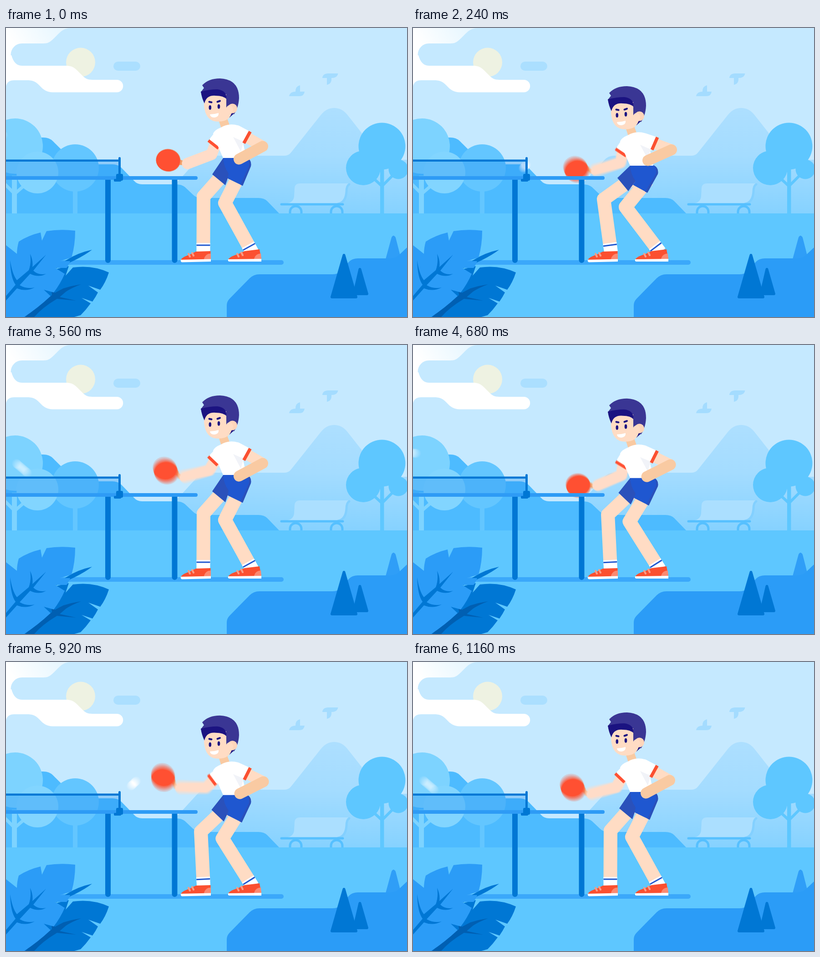
An HTML page for the animation above (1200 ms loop, 881 px wide and 636 px high).

```html
<!DOCTYPE html>
<html lang="en">
<head>
<meta charset="utf-8">
<title>Table tennis in the park</title>
<style>
html, body { margin: 0; width: 100%; height: 100%; overflow: hidden; background: #c5e9ff; }
svg { display: block; width: 881px; height: 636px; }
.blur { isolation: isolate; }
.blur > * { mix-blend-mode: plus-lighter; }
.line { fill: none; stroke-linecap: round; stroke-linejoin: round; }
</style>
</head>
<body>
<svg viewBox="0 0 881 636" xmlns="http://www.w3.org/2000/svg">
  <defs>
    <linearGradient id="mist" gradientUnits="userSpaceOnUse" x1="30" y1="60" x2="125" y2="0">
      <stop offset="0" stop-color="#fff"/><stop offset="1" stop-color="#e6f6ff"/>
    </linearGradient>
    <linearGradient id="peak" gradientUnits="userSpaceOnUse" x1="0" y1="176" x2="0" y2="408">
      <stop offset="0" stop-color="#addfff"/><stop offset=".45" stop-color="#a4dcff"/><stop offset="1" stop-color="#86d2ff"/>
    </linearGradient>
  </defs>

  <!-- sky -->
  <rect width="881" height="636" fill="#c5e9ff"/>
  <circle cx="164" cy="75.500" r="32" fill="#eef2e2"/>
  <path fill="url(#mist)" d="M0 0H141C128 1 122 6 114 14L105 23C97 31 92 34 82 34H35A24.500 24.500 0 0 0 35 83H0Z"/>
  <path fill="#fff" d="M0 60H12Q18 83 35 83H132C146 83 151 88 158 95L167 104C174 111 179 114 190 114H243.500A13.500 13.500 0 0 1 243.500 141.500H103C90 141 84 137 78 131L72 125C64 117 57 115 46 115H18Q3 115 0 128Z"/>
  <rect x="236" y="74" width="59" height="20" rx="10" fill="#abdfff"/>
  <g fill="#a4dcff">
    <path d="M622 150Q624 140 636 140Q636 128 646 126V140H656Q655 150 644 150Z"/>
    <path d="M695 110Q696 100 708 100H729.500Q728 110 715 110Q716 123 705 125V110Z"/>
  </g>

  <!-- far hills -->
  <path fill="url(#peak)" d="M370 408V345L388 326L420 291Q429 281 441 281H612Q621 281 627 273L692 191Q704 176 721 176Q738 176 750 191L820 280Q828 290 840 290H881V408Z"/>
  <path fill="#4dbbff" d="M0 241H82Q95 241 103 249L144 290Q154 300 166 300H234Q246 300 254 308L281 336Q288 344 299 344H373Q386 344 393 350L411 367Q418 374 428 374H554Q567 374 574 381L600 408H0Z"/>

  <!-- trees -->
  <g fill="#63c6ff">
    <circle cx="152" cy="308" r="52"/><rect x="147" y="350" width="10" height="58"/>
  </g>
  <g fill="#7dd3ff">
    <rect x="13" y="325" width="11" height="83"/>
    <circle cx="20" cy="260" r="61"/>
    <path d="M-4 342L19 365L42 345" fill="none" stroke="#7dd3ff" stroke-width="7"/>
    <circle cx="69" cy="318" r="46" fill="#82d5ff"/>
  </g>
  <g fill="#5ec7ff">
    <circle cx="826" cy="260" r="51.500"/><circle cx="785" cy="308" r="38"/><circle cx="862" cy="311" r="21.500"/>
    <rect x="822" y="310" width="8.500" height="98"/>
    <path d="M800 324L826 348L852 322" fill="none" stroke="#5ec7ff" stroke-width="6"/>
  </g>

  <!-- bench -->
  <path fill="#abdfff" d="M645 342H754Q749 348 748 361Q746 386 728 386H618Q632 383 633 370L634 352Q635 342 645 342Z"/>
  <g class="line" stroke="#56c0ff" stroke-width="5">
    <path stroke="#83d0ff" d="M754 344Q748 347 748 361Q746 384 730 387"/>
    <path d="M605 388H740"/>
    <path stroke-linecap="butt" d="M624 409V404A12.500 12 0 0 1 649 404V409M714 409V404A12.500 12 0 0 1 739 404V409"/>
  </g>

  <!-- ground -->
  <rect y="408" width="881" height="228" fill="#5ec7ff"/>
  <rect x="110" y="511" width="500" height="10" rx="5" fill="#3ba8fa"/>
  <path fill="#2f9ef7" d="M832 516L847 461Q851 453 856 461L870 516Z"/>
  <path fill="#2b9cf7" d="M485 636V611Q485 602 491 596L535 551Q544 542 557 542H718Q730 542 738 533L752 516Q760 507 773 507H842Q855 507 863 500L881 483V636Z"/>
  <g fill="#0077d4" stroke="#0077d4" stroke-width="6" stroke-linejoin="round">
    <path d="M742.500 500L716 592H769Z"/><path d="M777.500 531L765 585H793Z"/>
  </g>

  <g id="player"></g>
  <g id="ball" class="blur"></g>

  <!-- table -->
  <path class="line" stroke="#0077d4" stroke-width="12" d="M224 334V511M370.500 334V511"/>
  <rect y="293" width="249" height="33" fill="#1e8cf0" opacity=".33"/>
  <rect x="-9" y="326" width="430" height="8" rx="4" fill="#2e9bf5"/>
  <g fill="#0077d4">
    <rect y="289.500" width="249" height="4.500"/><rect x="247" y="284" width="5" height="46" rx="2.500"/>
    <rect x="242" y="321" width="15" height="15" rx="3"/><rect x="237" y="332" width="16" height="6" rx="2"/>
  </g>

  <!-- leaves -->
  <g fill="#0077d4">
    <path d="M108 530Q142 498 189 488Q164 507 122 524Z"/>
    <path d="M40 636L112 530L138 524L131 545L147 527Q190 521 226 538Q219 560 207 576L181 567L202 582Q197 592 190 602L166 594L186 606Q176 620 164 632L150 636Z"/>
  </g>
  <path fill="#005fb2" d="M42 636Q70 608 101 588L98 556L107 583L126 573Q145 567 165 564Q144 572 132 580L118 592L154 600L112 596Q80 615 62 636Z"/>
  <path fill="#2b9cf7" d="M0 478L24 497Q24 484 28 470Q50 456 76 450L79 468L89 447Q120 442 152 446Q152 478 144 505L118 513L141 513Q137 523 133 528L108 528L129 541Q120 562 105 582L83 576L98 590Q70 616 40 636H0Z"/>
  <path fill="#0077d4" d="M-2 592L21 565Q10 550 9 511Q14 543 24 555L50 533Q56 518 53 497Q60 512 58 526L88 499L60 534Q72 545 88 541Q72 550 53 541L30 566Q45 575 63 571Q44 581 24 573L-2 602Z"/>
</svg>

<script>
const LOOP = 1200, STEP = 40, HALF = 600, SHUTTER = 18;
const SKIN = '#ffdcc4', TAN = '#f9caa2', RED = '#fb5030', BLUE = '#1f57d0', NAVY = '#2a51bb', INK = '#1b1381', HAIR = '#3a3694';
const player = document.getElementById('player');
const ball = document.getElementById('ball');

const mix = (a, b, u) => a + (b - a) * u;
const smooth = u => u * u * (3 - 2 * u);
const rad = deg => deg * Math.PI / 180;
const fix = n => n.toFixed(2);
const poly = (points, fill) => `<polygon fill="${fill}" points="${points}"/>`;
const line = (d, color, width, extra = '') => `<path class="line" stroke="${color}" stroke-width="${width}" ${extra} d="${d}"/>`;

// [phase, upper arm, forearm, bat], angles in degrees
const SWING = [
  [0, 20, 21, 9.5], [165, -4, 26, -12], [400, 65, -11, 45], [465, 65, -11, 45], [600, 20, 21, 9.5]
];

function armPose(t) {
  const p = (t + LOOP) % HALF;
  const i = SWING.findIndex((key, n) => n && p <= key[0]);
  const a = SWING[i - 1], b = SWING[i];
  const u = smooth((p - a[0]) / (b[0] - a[0]));
  return [1, 2, 3].map(n => mix(a[n], b[n], u));
}

function crouch(t) {
  const p = (t + LOOP) % HALF;
  return p > 400 ? 0 : 19 * smooth(1 - Math.abs(p - 200) / 200);
}

function ballAt(t) {
  t = (t + LOOP) % LOOP;
  const p = t % HALF, land = t < HALF ? 210 : 832;
  const bounce = land % HALF;
  if (p < bounce) {
    const u = 1 - (bounce - p) / 152;
    return [mix(-7, 236, u), 237 + 79 * Math.sign(u) * Math.abs(u) ** 1.4];
  }
  if (p < 400) {
    const u = ((p - bounce) / (400 - bounce)) ** 1.3;
    return [mix(236, 339, u), 316 - 89 * (1 - (1 - u) ** 1.4)];
  }
  if (p < 520) {
    const u = (p - 400) / 120;
    return [mix(339, 88, u), 227 + 89 * u ** 1.6];
  }
  const u = (p - 520) / 40;
  return [88 - 53 * u, 316 - 45 * u];
}

// Averages several moments inside the open shutter.
function exposure(t, count, draw) {
  let out = '';
  for (let i = 0; i < count; i++) {
    const moment = t + SHUTTER * (i / (count - 1) - 0.5);
    out += `<g opacity="${1 / count}">${draw(moment)}</g>`;
  }
  return out;
}

function batArm(t) {
  const [upper, fore, bat] = armPose(t);
  const ex = 463 - 33 * Math.sin(rad(upper)), ey = 247 + 33 * Math.cos(rad(upper));
  const hx = ex - 56.5 * Math.cos(rad(fore)), hy = ey + 56.5 * Math.sin(rad(fore));
  return `<g transform="translate(0 ${fix(crouch(t))})">
    <g transform="translate(${fix(hx)} ${fix(hy)}) rotate(${fix(bat)})">
      <path fill="#f0a068" d="M-24 -7L-8 -4V5L-24 7Z"/>
      <ellipse cx="-43" rx="27" ry="24.800" fill="#ee7a55"/>
      <ellipse cx="-43.500" cy=".3" rx="26.300" ry="24" fill="${RED}"/>
    </g>
    ${line(`M463 247L${fix(ex)} ${fix(ey)}L${fix(hx)} ${fix(hy)}`, SKIN, 25)}
    <g transform="translate(466 243) rotate(${fix(26.4 + 0.58 * upper)})">
      <rect x="-14" y="-10" width="27" height="25" rx="5" fill="#fff"/>
      <rect x="-14" y="13.500" width="28" height="6.500" fill="${RED}"/>
    </g>
  </g>`;
}

function leg(hip, knee, ankle) {
  const turn = Math.atan2(ankle[0] - knee[0], ankle[1] - knee[1]) * -180 / Math.PI;
  return line(`M${hip}L${knee}L${ankle}`, SKIN, 30, 'style="stroke-linecap:butt"') +
    `<g transform="translate(${ankle}) rotate(${fix(turn)})">
      <rect x="-15" y="-9" width="30" height="20" fill="#fff"/>
      <rect x="-15" y="-5.500" width="30" height="3" fill="${BLUE}"/>
    </g>`;
}

const shoes = `
  <path fill="${RED}" d="M384 511Q386 504 403 499L417 492L449.500 491V511Z"/>
  <path fill="#fb8a72" d="M450 496.500A14 14 0 0 0 435 511H450Z"/>
  <path fill="#fff" d="M384 510L450 508.500V514L387 515.500Q383 515 384 510Z"/>
  <path fill="${RED}" d="M488 510Q491 503 509 498L524 491L557 487L561 509Z"/>
  <path fill="#fb8a72" d="M560 496.500A14 14 0 0 0 545 510H561Z"/>
  <path fill="#fff" d="M488 509L561 508V514H491Q487 514 488 509Z"/>
  ${line('M401 497L404 503M409 495L412 501M508 497L511 503M517 494L520 500', '#fb9c86', 4)}`;

const head = `
  ${poly('467,202 486,199 492,216 482,219 473,221', TAN)}
  <path fill="${INK}" d="M491 197V184H505Q499 190 491 197Z"/>
  <path fill="${HAIR}" d="M428 141L435 132L431 126Q445 111 470 111Q512 113 512 154Q511 175 501 190L484 180Z"/>
  <path fill="${SKIN}" d="M437 146H484V174L497 176Q497 206 466 206Q438 206 435 170Z"/>
  <path fill="${INK}" d="M428 140Q447 135 464 135Q485 137 485 157Q478 149 461 149Q440 147 436 166Q430 154 428 140Z"/>
  <path fill="${HAIR}" d="M484 148H498V172L484 175Z"/>
  <circle cx="497.500" cy="177" r="10.500" fill="#fed5ba"/>
  <ellipse cx="491" cy="180" rx="8" ry="10" fill="${SKIN}"/>
  <ellipse cx="448.300" cy="175" rx="2.800" ry="5" fill="${INK}"/>
  <ellipse cx="467.500" cy="172.800" rx="2.800" ry="5" fill="${INK}"/>
  ${line('M446.500 162.500L451.500 163.500M464.500 162.500L470 160.500', INK, 4)}
  <path fill="#fff" d="M448 190Q458 190 467 187Q468 196 457 197Q449 197 448 190Z"/>`;

function torso(k) {
  const top = [536.5 + 0.5 * k, 228 - 4.5 * k], low = [522.5 + 2.5 * k, 253.5 - 2.5 * k];
  const elbow = [564 + 4 * k, 260.5 - 9.5 * k], hand = [512 + 4 * k, 288.5 - 14 * k];
  const mid = [(top[0] + low[0]) / 2, (top[1] + low[1]) / 2];
  return `<path fill="#fff" d="M472 219Q490 208 512 215L${top}L${low}L521 253L528 286H477L467 263L458 244L455 232Q459 224 472 219Z"/>
    ${poly('499,240 522,250 516,272', '#f1f3f8')}
    ${line(`M${mid}L${elbow}`, SKIN, 24, 'style="stroke-linecap:butt"')}
    ${line(`M${top}L${low}`, RED, 7, 'style="stroke-linecap:butt"')}
    ${line(`M${elbow}L${hand}`, TAN, 24)}`;
}

function shorts(off, k) {
  const at = (x, y, dx, dy) => [x + dx * k, y + dy * k];
  const hem = at(520, 347, -5, 15.5), inner = at(487, 331, -4, 14);
  return poly([[478, 285 + off], at(453, 322, -4, 8), at(482, 346, -9, 13), inner, [505, 300 + off]].join(' '), NAVY) +
    `<path fill="${BLUE}" d="M477 ${285 + off}H529Q540 ${291 + off} 538 ${304 + off}L${hem}L${inner}L489 ${320 + off}Q478 ${305 + off} 477 ${285 + off}Z"/>
    <path fill="${NAVY}" d="M530 ${286 + off}Q540 ${291 + off} 538 ${304 + off}L${hem}l-5 -2L534 ${303 + off}Q535 ${294 + off} 530 ${286 + off}Z"/>`;
}

function render(t) {
  const off = crouch(t), k = off / 17;
  player.innerHTML =
    leg([487, 311 + off], [434 - 15 * k, 371 + 6 * k], [433.5, 482]) +
    leg([515, 318 + off], [481 - 14 * k, 385 + 9 * k], [536, 485]) +
    shoes + shorts(off, k) +
    `<g class="blur">${exposure(t, 5, batArm)}</g>` +
    `<g transform="translate(0 ${fix(off)})">${head}${torso(k)}</g>`;
  const still = t % HALF === 400;
  ball.innerHTML = exposure(t, 15, moment => {
    const [x, y] = ballAt(still ? t : moment);
    return `<circle cx="${fix(x)}" cy="${fix(y)}" r="10" fill="#fff"/>`;
  });
}

const start = performance.now();
let shown = -1;
function tick() {
  const t = Math.floor((performance.now() - start) % LOOP / STEP) * STEP;
  if (t !== shown) render(shown = t);
  requestAnimationFrame(tick);
}
tick();
</script>
</body>
</html>
```
